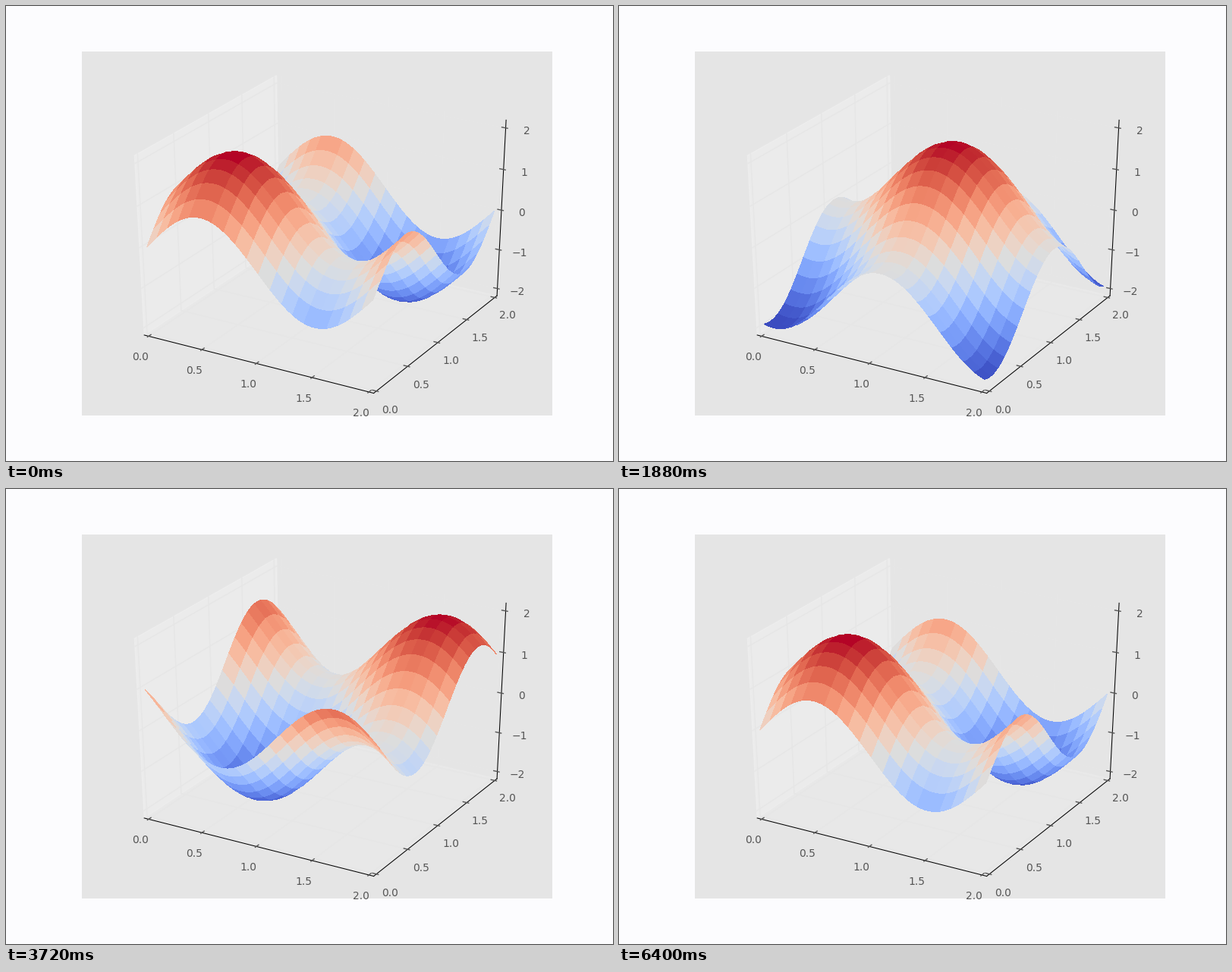
Recreate the animation shown at these times as a matplotlib script. Size 800 px wide and 600 px high, loop 6440 ms.

```python
import numpy as np
import matplotlib.pyplot as plt
from matplotlib.animation import FuncAnimation
from matplotlib.collections import PolyCollection
from matplotlib.patches import Polygon, Rectangle

FRAMES, INTERVAL = 161, 40
SIZE, Z_RANGE = 2.0, 4.2
POINTS, STRIDE = 200, 10             # samples per side, samples per facet
EDGE = 0.5 + 1 / 48                  # half width of the box around the data
LABEL_PAD = 0.0606                   # gap between axis line and label
AZIM, ELEV, DIST = np.radians(-60), np.radians(30), 10

PAGE = (0.988, 0.988, 0.996)
BACK = "#e5e5e5"
WALL = (0.95, 0.95, 0.95, 0.5)
FLOOR = (0.925, 0.925, 0.925, 0.5)
GRID = (0.9, 0.9, 0.9)
INK = "#555555"


def project(x, y, z):
    """Unit cube coordinates (-0.5..0.5) to stage pixels and distance."""
    ca, sa, ce, se = np.cos(AZIM), np.sin(AZIM), np.cos(ELEV), np.sin(ELEV)
    right = -sa * x + ca * y
    up = -se * ca * x - se * sa * y + ce * z
    w = DIST - (ce * ca * x + ce * sa * y + se * z)
    px = 100 + 620 * (right / w + 0.095) / 0.185
    py = 540 - 480 * (up / w + 0.095) / 0.185
    return px, py, w


fig = plt.figure(figsize=(8, 6), dpi=100, facecolor=PAGE)
ax = fig.add_axes([0, 0, 1, 1])
ax.set(xlim=(0, 800), ylim=(600, 0))
ax.axis("off")
ax.add_patch(Rectangle((100, 60), 620, 480, color=BACK, lw=0))


def pane(corners, color):
    pts = [project(*c)[:2] for c in corners]
    ax.add_patch(Polygon(pts, facecolor=color, edgecolor=color, lw=1))


def line(points, color, width):
    px, py, _ = project(*np.array(points, float).T)
    ax.plot(px, py, color=color, lw=width)


def tick(pos, axis, along, text):
    """Short mark across the axis line plus its label, pushed outwards."""
    pos = np.array(pos)
    out = np.sign(pos)
    mark = np.zeros(3)
    mark[along] = out[along] / 12
    line([pos + 0.1 * mark, pos - 0.2 * mark], INK, 1)
    out[axis] = 0
    px, py, _ = project(*(pos + LABEL_PAD * out))
    ax.text(px, py, text, family="DejaVu Sans", size=10, color=INK,
            ha="center", va="top")


E = EDGE
pane([(-E, -E, -E), (-E, E, -E), (-E, E, E), (-E, -E, E)], WALL)
pane([(-E, -E, -E), (E, -E, -E), (E, E, -E), (-E, E, -E)], FLOOR)

flat = [(v / SIZE - 0.5, f"{v:.1f}") for v in np.arange(0, 2.1, 0.5)]
tall = [(v / Z_RANGE, str(v).replace("-", "\u2212")) for v in range(-2, 3)]

for p, _ in flat:
    line([(p, -E, -E), (p, E, -E), (p, E, E)], GRID, 1)
    line([(E, p, -E), (-E, p, -E), (-E, p, E)], GRID, 1)
for p, _ in tall:
    line([(-E, -E, p), (-E, E, p), (E, E, p)], GRID, 1)

line([(-E, -E, -E), (E, -E, -E)], "black", 0.75)
line([(E, -E, -E), (E, E, -E)], "black", 0.75)
line([(E, E, -E), (E, E, E)], "black", 0.75)

for p, text in flat:
    tick((p, -E, -E), 0, 1, text)
    tick((E, p, -E), 1, 0, text)
for p, text in tall:
    tick((E, E, p), 2, 0, text)

# Outline of every facet, walked around its four sides
s = np.arange(STRIDE)
o = np.zeros(STRIDE)
loop_x = np.concatenate([s, o + STRIDE, STRIDE - s, o])
loop_y = np.concatenate([o, s, o + STRIDE, STRIDE - s])
starts = np.arange(0, POINTS - 1, STRIDE)
col, row = (g.reshape(-1, 1) for g in np.meshgrid(starts, starts))
X = np.minimum(col + loop_x, POINTS - 1) * SIZE / (POINTS - 1)
Y = np.minimum(row + loop_y, POINTS - 1) * SIZE / (POINTS - 1)

coolwarm = plt.get_cmap("coolwarm")
surface = PolyCollection([], linewidths=0, antialiaseds=False, zorder=5)
ax.add_collection(surface, autolim=False)


def update(i):
    phase = 2 * np.pi * i / (FRAMES - 1)
    Z = np.sin(np.pi * X - phase) + np.sin(np.pi * Y - phase)
    px, py, w = project(X / SIZE - 0.5, Y / SIZE - 0.5, Z / Z_RANGE)
    order = np.argsort(-w.mean(axis=1), kind="stable")
    height = Z.mean(axis=1)
    colors = coolwarm((height - height.min()) / np.ptp(height))
    surface.set_verts(np.stack([px, py], axis=-1)[order])
    surface.set_facecolor(colors[order])
    return [surface]


anim = FuncAnimation(fig, update, frames=FRAMES, interval=INTERVAL, repeat=True)
plt.show()
```
